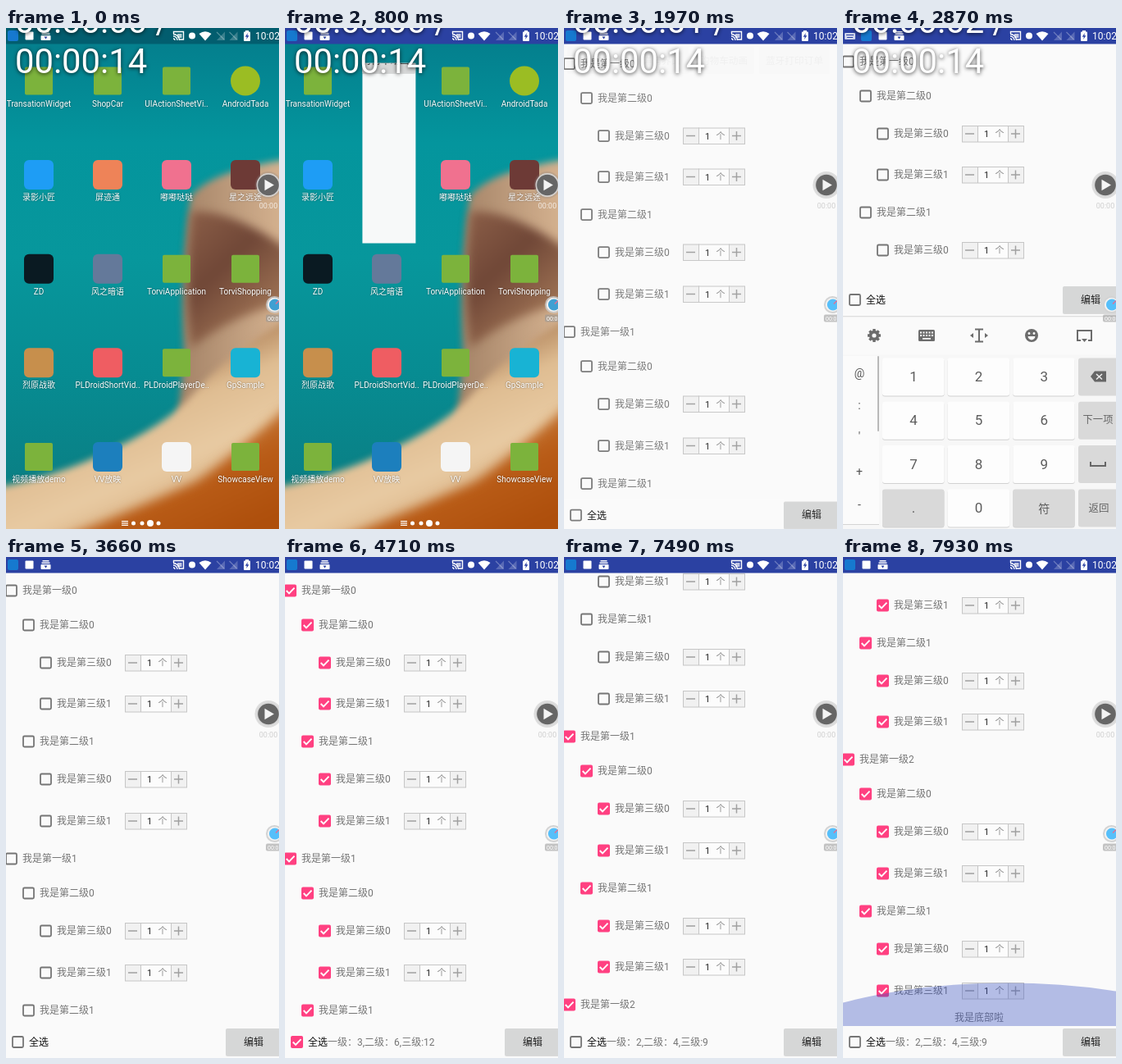
An HTML page with a canvas for the animation above (8000 ms loop, 333 by 611 pixels).

```html
<!DOCTYPE html>
<html lang="zh">
<head>
<meta charset="utf-8">
<title>Cart demo</title>
<style>
html, body { margin: 0; width: 100%; height: 100%; overflow: hidden; background: #fafafa; }
canvas { display: block; width: 100vw; height: 100vh; }
</style>
</head>
<body>
<canvas id="stage"></canvas>
<script>
const W = 333, H = 611, LOOP = 8000, FRAME = 89.1, BAR_H = 39, TOP = 20;
const GRAY = '#757575', PINK = '#ff4081', PAPER = '#fafafa', KEY = '#d9d9d9', BLUE = '#2b41a2';
const FONT = 'Roboto, "Noto Sans CJK SC", "Noto Sans CJK", sans-serif';
const cv = document.getElementById('stage'), c = cv.getContext('2d');

const clamp = v => Math.max(0, Math.min(1, v));
const ramp = (t, a, b) => clamp((t - a) / (b - a));
const mix = (a, b, p) => a + (b - a) * p;
const easeOut = p => 1 - (1 - p) ** 3;

function box(x, y, w, h, fill, r = 0) {
  c.fillStyle = fill;
  c.beginPath();
  c.roundRect(x, y, w, h, r);
  c.fill();
}
function dot(x, y, r, fill) {
  c.fillStyle = fill;
  c.beginPath();
  c.arc(x, y, r, 0, 7);
  c.fill();
}
function poly(pts, fill) {
  c.fillStyle = fill;
  c.beginPath();
  pts.forEach(([x, y]) => c.lineTo(x, y));
  c.fill();
}
function line(pts, color, w = 1) {
  c.strokeStyle = color;
  c.lineWidth = w;
  c.beginPath();
  pts.forEach(([x, y], i) => i ? c.lineTo(x, y) : c.moveTo(x, y));
  c.stroke();
}
function text(s, x, y, size, color, align = 'left', weight = 400) {
  c.font = `${weight} ${size}px ${FONT}`;
  c.fillStyle = color;
  c.textAlign = align;
  c.fillText(s, x, y);
}
function layer(fn, alpha = 1) {
  c.save();
  c.globalAlpha *= alpha;
  fn();
  c.restore();
}
function clip(x, y, w, h) {
  c.beginPath();
  c.rect(x, y, w, h);
  c.clip();
}
function gradient(x0, y0, x1, y1, ...colors) {
  const g = c.createLinearGradient(x0, y0, x1, y1);
  colors.forEach((k, i) => g.addColorStop(i / (colors.length - 1), k));
  return g;
}

// Home screen
const GREEN = '#7cb33c';
const APPS = [
  ['TransationWidget', GREEN], ['ShopCar', GREEN], ['UIActionSheetVi..', GREEN], ['AndroidTada', '#9bbd23'],
  ['录影小匠', '#1e9df5'], ['屏迹通', '#ee8358'], ['嘟嘟哒哒', '#f0718f'], ['星之远途', '#6d3a36'],
  ['ZD', '#0a1a22'], ['风之暗语', '#64799a'], ['TorviApplication', GREEN], ['TorviShopping', GREEN],
  ['烈原战歌', '#c78f4c'], ['PLDroidShortVid..', '#ef5d62'], ['PLDroidPlayerDe..', GREEN], ['GpSample', '#18b3d4'],
  ['视频播放demo', GREEN], ['VV放映', '#1c7fbd'], ['VV', '#f5f5f5'], ['ShowcaseView', GREEN]
];

// Soft shape; longer entries are quadratic curves
function blob(blur, fill, x, y, ...parts) {
  layer(() => {
    c.filter = `blur(${blur * cv.width / W}px)`;
    c.fillStyle = fill;
    c.beginPath();
    c.moveTo(x, y);
    parts.forEach(k => k.length > 2 ? c.quadraticCurveTo(...k) : c.lineTo(...k));
    c.fill();
  });
}
function wallpaper() {
  box(0, 0, W, H, gradient(0, 0, 0, 560, '#047c8b', '#04959d', '#07979c', '#078c92', '#0a7f84'));
  blob(4, gradient(215, 0, W, 0, '#a58468', '#d3b08e'), 360, 158, [250, 172, 225, 206],
    [212, 300, 217, 390], [215, 440, 208, 480], [360, 470]);
  blob(6, gradient(220, 220, W, 340, '#8d6049', '#704737', '#a07455'), 226, 224, [280, 220, 360, 282],
    [360, 330], [280, 346, 226, 390], [217, 330, 226, 224]);
  blob(4, gradient(100, 440, 175, 611, '#a77850', '#dfbd92', '#e8caa2', '#d9b285'), -20, 562,
    [60, 548, 121, 518], [195, 484, 225, 450], [275, 392, 360, 346], [360, 640], [-20, 640]);
  blob(7, gradient(230, 480, 290, 611, '#c98243', '#b95c17', '#ae4f0c'), 360, 446,
    [290, 512, 232, 553], [150, 590, 50, 630], [360, 640]);
}
function home() {
  wallpaper();
  APPS.forEach(([name, color], i) => {
    const x = 40 + 84 * (i % 4), y = 64.5 + 114.6 * (i >> 2);
    if (i === 3) dot(x, y, 18, color);
    else if (color === GREEN) box(x - 17, y - 17, 34, 34, color, 2);
    else box(x - 18, y - 18, 36, 36, color, 6);
    layer(() => {
      c.shadowColor = 'rgba(0,0,0,.5)';
      c.shadowBlur = 2;
      text(name, x, y + 31, 10, '#fff', 'center');
    });
  });
  for (let i = 0; i < 3; i++) box(141, 601 + i * 2.4, 8, 1.2, '#fff');
  [155.5, 166, 176, 186].forEach((x, i) => dot(x, 604, i === 2 ? 4 : 2.5, '#fff'));
}

// First activity: a row of buttons
const MENU = [['购物车界面', 4, 76], ['详情界面', 86, 66], ['购物车动画', 158, 74], ['蓝牙打印订单', 238, 86]];

function menu(t) {
  box(-10, 0, W + 20, H, '#f7f9f9');
  MENU.forEach(([s, x, w], i) => {
    box(x, 24, w, 32, 'rgba(0,0,0,.12)', 2);
    box(x, 23, w, 32, '#d6d7d7', 2);
    const p = i ? 0 : ramp(t, 1610, 1880);
    if (p) layer(() => {
      clip(x, 23, w, 32);
      dot(x + w / 2, 39, 48 * p, 'rgba(0,0,0,.12)');
    });
    text(s, x + w / 2, 44, 11.7, '#333', 'center');
  });
}

// Cart list
const ROWS = [];
let listEnd = TOP;
function addRow(lv, g, s, n) {
  const h = lv === 2 ? 50.55 : 41.7;
  ROWS.push({ lv, g, s, n, y: listEnd + h / 2 });
  listEnd += h;
}
for (let g = 0; g < 3; g++) {
  addRow(0, g, 0, g);
  for (let s = 0; s < 2; s++) {
    addRow(1, g, s, s);
    for (let n = 0; n < 2; n++) addRow(2, g, s, n);
  }
}
const T_ALL = 4110, T_CLEAR = 6430, T_ONE = 6780, FADE = 130;
const step = (t, at) => ramp(t, at, at + FADE);

function checked(r, t) {
  const on = step(t, T_ALL);
  if (r.g) return on;
  const back = r.lv === 2 && !r.s && !r.n ? step(t, T_ONE) : 0;
  return Math.max(on - step(t, T_CLEAR), back);
}
function checkbox(x, y, on) {
  if (on < 1) {
    c.strokeStyle = GRAY;
    c.lineWidth = 1.8;
    c.beginPath();
    c.roundRect(x - 6.5, y - 6.5, 13, 13, 1.5);
    c.stroke();
  }
  if (on > 0) layer(() => {
    box(x - 7.5, y - 7.5, 15, 15, PINK, 2);
    line([[x - 4.8, y], [x - 1.5, y + 3.4], [x + 5, y - 3.4]], '#fff', 1.9);
  }, on);
}
function stepper(y) {
  box(145, y - 10, 76, 20, '#f1f1f1');
  box(164, y - 10, 38, 20, '#fcfcfc');
  c.strokeStyle = '#c6c6c6';
  c.lineWidth = 1;
  c.strokeRect(145.5, y - 9.5, 75, 19.5);
  line([[164.5, y - 10], [164.5, y + 10]], '#c6c6c6');
  line([[201.5, y - 10], [201.5, y + 10]], '#c6c6c6');
  line([[149, y], [160, y]], '#a0a0a0', 1.5);
  line([[205, y], [216, y]], '#a0a0a0', 1.5);
  line([[210.5, y - 5.5], [210.5, y + 5.5]], '#a0a0a0', 1.5);
  text('1', 175, y + 4, 11, '#222', 'center');
  text('个', 191, y + 4, 11, '#8a8a8a', 'center');
}
function glow(p, bottom) {
  if (!p) return;
  c.fillStyle = `rgba(55,78,190,${.36 * p})`;
  c.beginPath();
  c.ellipse(200, bottom + 120 - 52.5 * p, 333, 120, 0, 0, 7);
  c.fill();
}
function summary(t) {
  if (t < T_ALL) return '';
  const n = t < T_CLEAR ? [3, 6, 12] : [2, 4, t < T_ONE ? 8 : 9];
  return `一级：${n[0]},二级：${n[1]},三级:${n[2]}`;
}
function cart(t, bottom) {
  const scroll = Math.round(448.3 * ramp(t, 6960, 7840) ** 2.13), listBottom = bottom - BAR_H;
  box(0, 0, W, H, PAPER);
  layer(() => {
    clip(0, TOP, W, listBottom - TOP);
    for (const r of ROWS) {
      const y = Math.round(r.y) - scroll;
      if (y < -10 || y > H) continue;
      checkbox(6.5 + 21 * r.lv, y, checked(r, t));
      text(`我是第${'一二三'[r.lv]}级${r.n}`, 20 + 21 * r.lv, y + 4.3, 12, GRAY);
      if (r.lv === 2) stepper(y);
    }
    text('我是底部啦', 166, listEnd + 12.5 - scroll, 12, GRAY, 'center');
    if (t > 2930 && t < 4430 && Math.floor((t - 2930) / 500) % 2 === 0) box(171, 121, 1, 15, PINK);
    glow(easeOut(ramp(t, 7780, 7930)), listBottom);
  });
  const y = bottom - 19.5;
  box(0, listBottom, W, BAR_H, PAPER);
  checkbox(14.5, y, step(t, T_ALL) - step(t, T_CLEAR));
  text('全选', 28, y + 4.5, 12, '#111', 'left', 500);
  text(summary(t), 52, y + 4.5, 12, GRAY);
  box(268, y - 15.5, 70, 33, 'rgba(0,0,0,.13)', 2);
  box(268, y - 16.5, 70, 33, '#d6d7d7', 2);
  text('编辑', 302, y + 4, 12, '#222', 'center', 500);
}

// Number keyboard, drawn from its top edge
function keyIcons() {
  const k = '#6c6c6c';
  for (let i = 0; i < 8; i++) {
    const a = i * Math.PI / 4;
    line([[38, 24], [38 + 8 * Math.cos(a), 24 + 8 * Math.sin(a)]], k, 3.4);
  }
  dot(38, 24, 6.2, k);
  dot(38, 24, 2.6, PAPER);
  box(92, 17, 20, 14, k, 1.5);
  for (let i = 0; i < 10; i++) box(94 + 3.5 * (i % 5), 19.5 + 3.5 * (i / 5 | 0), 2, 2, PAPER);
  box(97, 27, 10, 1.7, PAPER);
  line([[161, 16.5], [171, 16.5]], k, 2);
  line([[161, 31.5], [171, 31.5]], k, 2);
  line([[166, 16], [166, 32]], k, 2);
  poly([[155, 24], [159, 21], [159, 27]], k);
  poly([[177, 24], [173, 21], [173, 27]], k);
  dot(230, 24, 8, k);
  dot(227, 21.5, 1.4, PAPER);
  dot(233, 21.5, 1.4, PAPER);
  c.fillStyle = PAPER;
  c.beginPath();
  c.arc(230, 25, 4.4, 0, Math.PI);
  c.fill();
  line([[290, 30], [286, 30], [286, 18], [303, 18], [303, 30], [299, 30]], k, 2);
  poly([[291, 28], [298, 28], [294.5, 32]], k);
}
function keyboard(top) {
  if (top >= H) return;
  layer(() => {
    c.translate(0, top);
    box(0, 0, W, 270, '#f7f7f7');
    box(0, 0, W, 1.5, '#dedede');
    box(0, 1.5, W, 46, PAPER);
    keyIcons();
    box(0, 49, 44, 205, '#fbfbfb');
    box(0, 254, 44, 1, '#d5d5d5');
    box(42, 49, 2, 92, '#b9b9b9', 1);
    ["@", ":", "'", "+", "-"].forEach((s, i) => text(s, 20, [75, 114, 152, 195, 235][i], 14, '#555', 'center'));
    [...'123456789.0符'].forEach((s, i) => {
      const x = 48 + 79.6 * (i % 3), y = 51.5 + 53.3 * (i / 3 | 0);
      box(x, y + 1, 75.5, 46, '#d2d2d2', 3);
      box(x, y, 75.5, 46, s === '.' || s === '符' ? KEY : '#fdfdfd', 3);
      text(s, x + 38, y + 28.5, s === '符' ? 14 : 17, '#5c5c5c', 'center');
    });
    for (let i = 0; i < 4; i++) box(287, 51.5 + 53.3 * i, 50, 46, KEY, 3);
    poly([[302, 74], [307, 67.5], [321, 67.5], [321, 80.5], [307, 80.5]], '#666');
    line([[309, 71], [316, 77.5]], '#eee', 1.5);
    line([[316, 71], [309, 77.5]], '#eee', 1.5);
    text('下一项', 311, 131, 12.3, '#666', 'center');
    line([[302, 178], [302, 183], [320, 183], [320, 178]], '#666', 2);
    text('返回', 312, 238.5, 12.5, '#666', 'center');
  });
}

// Overlays
function statusBar(fill, typing) {
  const w = '#fff';
  box(0, 0, W, 19.5, fill);
  let x = 8.5;
  if (typing) {
    box(2, 6, 13, 8, '#cdd4ec', 1);
    box(4, 8, 9, 1, BLUE);
    box(5, 11, 7, 1, BLUE);
    x += 20;
  }
  box(x - 6.5, 3, 13, 13, '#1679cf', 2);
  box(x + 15, 4.5, 10, 10, w, 1);
  box(x + 36, 4, 8, 1.5, w);
  box(x + 35, 6.5, 10, 1.5, w);
  box(x + 34, 9, 12, 6, w, 1);
  poly([[x + 38, 10.5], [x + 42, 10.5], [x + 40, 13.5]], BLUE);

  line([[204.5, 7], [204.5, 4.5], [216.5, 4.5], [216.5, 14], [212, 14]], w, 1.4);
  box(209, 7, 5.5, 5, 'rgba(255,255,255,.7)');
  for (const r of [2, 5, 7.5]) {
    c.strokeStyle = w;
    c.lineWidth = 1.3;
    c.beginPath();
    c.arc(204, 15, r, -Math.PI / 2, 0);
    c.stroke();
  }
  dot(227, 9.5, 4, w);
  c.fillStyle = w;
  c.beginPath();
  c.moveTo(243, 15.5);
  c.lineTo(235.5, 7);
  c.quadraticCurveTo(243, 1.5, 250.5, 7);
  c.fill();
  for (const s of [257, 272.5]) {
    poly([[s, 15], [s + 10, 15], [s + 10, 4.5]], 'rgba(255,255,255,.22)');
    line([[s, 5], [s + 9, 14]], 'rgba(255,255,255,.3)', 1.2);
  }
  box(290, 4.5, 8, 11.5, w, 1);
  box(292, 3, 4, 2, w);
  poly([[294.8, 6], [291.8, 10.8], [293.8, 10.8], [293.2, 14], [296.4, 9.2], [294.4, 9.2]], BLUE);
  text('10:02', 304, 14, 12, w);
}
function floats(dark) {
  dot(320, 191.5, 16.5, 'rgba(130,130,130,.25)');
  dot(320, 191.5, 14.5, 'rgba(215,215,215,.9)');
  dot(320, 191.5, 12.8, '#666');
  poly([[315.5, 184.8], [327, 191.5], [315.5, 198.2]], '#f4f4f4');
  text('00:00', 320, 220, 9, dark ? 'rgba(255,255,255,.75)' : '#cfcfcf', 'center');
  dot(327.5, 337.5, 10.5, dark ? 'rgba(205,205,205,.8)' : '#d3d3d3');
  dot(327.5, 337.5, 8.5, '#f3f3f3');
  dot(328, 337.5, 7, dark ? '#3f9fd2' : '#56bffa');
  line([[329, 336.5], [333, 332.5]], '#e46f92', 1.4);
  box(317, 349.5, 20, 9, 'rgba(150,150,150,.55)', 2);
  text('00:0', 319, 357, 7, '#fff');
}
function timecode(t) {
  const a = 1 - ramp(t, 3230, 3500);
  if (!a) return;
  layer(() => {
    c.shadowColor = 'rgba(0,0,0,.75)';
    c.shadowBlur = 5 * cv.width / W;
    c.shadowOffsetY = cv.width / W;
    text(`00:00:0${Math.floor(t / 1000)} /`, 11, 5.5, 41.8, '#fff');
    text('00:00:14', 11, 55, 41.8, '#fff');
  }, a);
}

function draw(t) {
  const opened = easeOut(ramp(t, 790, 1170));
  const entered = easeOut(ramp(t, 1790, 2060));
  const typing = easeOut(ramp(t, 2150, 2420)) - easeOut(ramp(t, 3230, 3500));
  const kbTop = mix(H, 351, typing);

  if (opened < 1) home();
  if (opened > 0 && entered < 1) layer(() => {
    const left = mix(106, 0, Math.min(1, opened * 1.2)), top = mix(47, 0, opened);
    clip(left, top, mix(142, W, opened) - left, mix(83, H, opened ** .45) - top);
    c.translate(-80 * (1 - opened), 0);
    menu(t);
  });
  if (entered > 0) layer(() => {
    c.translate(0, 50 * (1 - entered));
    cart(t, kbTop);
  }, entered);
  keyboard(kbTop);
  statusBar(opened > 0 ? BLUE : 'rgba(0,55,75,.45)', typing > .5);
  floats(opened < 1);
  timecode(t);
}

function fit() {
  const d = window.devicePixelRatio || 1;
  cv.width = Math.round(innerWidth * d);
  cv.height = Math.round(innerHeight * d);
}
addEventListener('resize', fit);
fit();

const start = performance.now();
function tick() {
  const t = (performance.now() - start) % LOOP;
  c.setTransform(cv.width / W, 0, 0, cv.height / H, 0, 0);
  draw(Math.floor((t + 10) / FRAME) * FRAME);
  requestAnimationFrame(tick);
}
tick();
</script>
</body>
</html>
```
